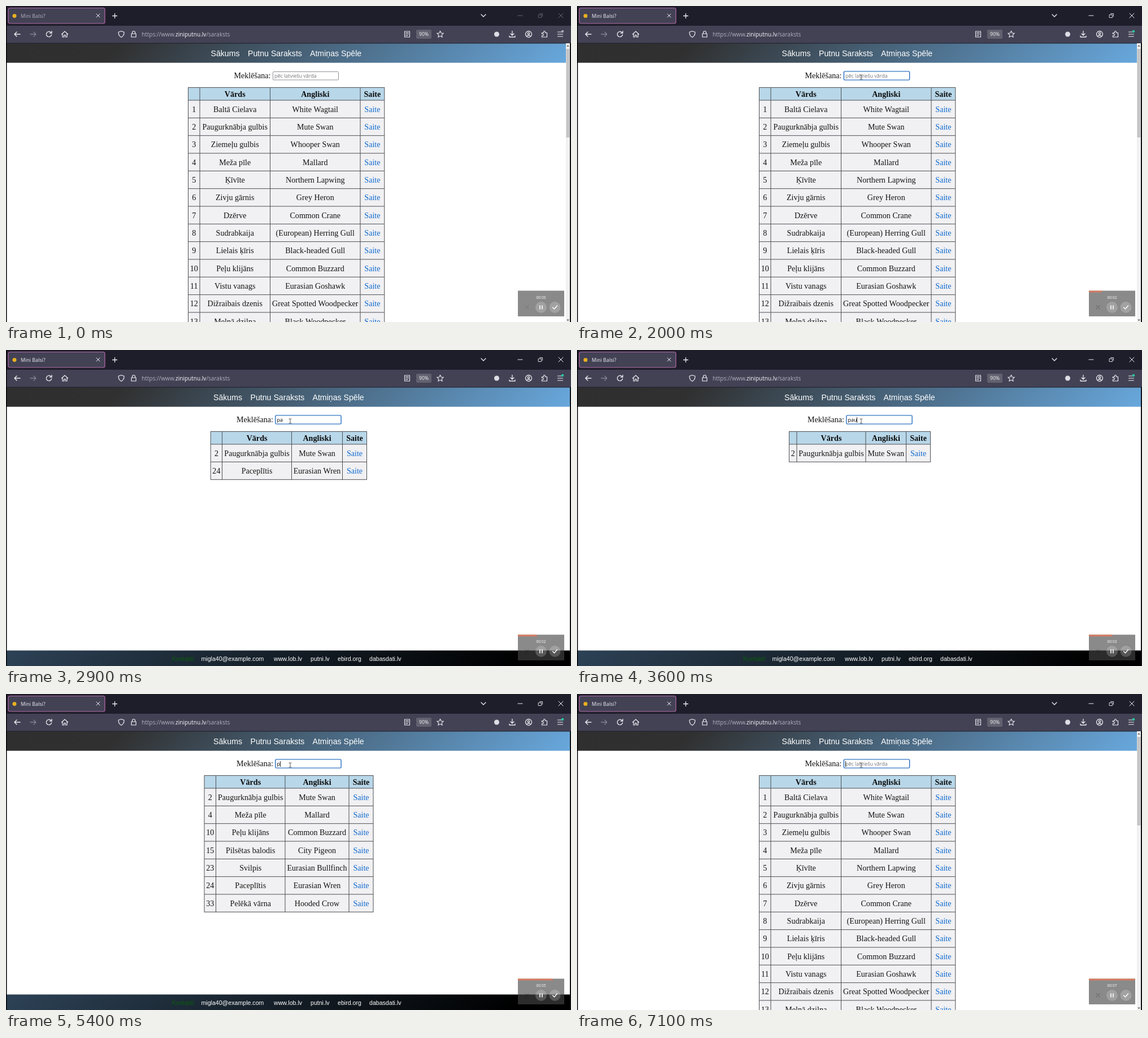
Write an HTML page with a canvas that moves like this. It is 1000 px wide and 560 px high and loops after 7.2 s.

```html
<!DOCTYPE html>
<html lang="lv">
<head>
<meta charset="utf-8">
<title>Mini Balsi?</title>
<style>
html, body { margin: 0; width: 100%; height: 100%; overflow: hidden; background: #000; }
canvas { display: block; }
</style>
</head>
<body>
<canvas id="stage" width="1000" height="560"></canvas>
<script>
const ctx = document.getElementById('stage').getContext('2d');
const LOOP = 7200, STEP = 100, FOCUS_AT = 1200;

const SERIF = '"Liberation Serif", "Times New Roman", serif';
const SANS = '"Liberation Sans", Arial, sans-serif';
const UI = '"Open Sans", "Noto Sans", sans-serif';
const LIGHT = '#ededf2';

const birds = [
  [1, 'Baltā Cielava', 'White Wagtail'],
  [2, 'Paugurknābja gulbis', 'Mute Swan'],
  [3, 'Ziemeļu gulbis', 'Whooper Swan'],
  [4, 'Meža pīle', 'Mallard'],
  [5, 'Ķīvīte', 'Northern Lapwing'],
  [6, 'Zivju gārnis', 'Grey Heron'],
  [7, 'Dzērve', 'Common Crane'],
  [8, 'Sudrabkaija', '(European) Herring Gull'],
  [9, 'Lielais ķīris', 'Black-headed Gull'],
  [10, 'Peļu klijāns', 'Common Buzzard'],
  [11, 'Vistu vanags', 'Eurasian Goshawk'],
  [12, 'Dižraibais dzenis', 'Great Spotted Woodpecker'],
  [13, 'Melnā dzilna', 'Black Woodpecker'],
  [15, 'Pilsētas balodis', 'City Pigeon'],
  [23, 'Svilpis', 'Eurasian Bullfinch'],
  [24, 'Paceplītis', 'Eurasian Wren'],
  [33, 'Pelēkā vārna', 'Hooded Crow']
];

// Column edges of the table for each search value
const columns = {
  '': [322.5, 343, 467.5, 627, 669.8],
  p: [351, 371.5, 494, 607, 650],
  pa: [362.2, 382.6, 505.5, 595.5, 638.5],
  pau: [375.5, 389, 511, 582.6, 625.5]
};

const typing = [
  [FOCUS_AT, ''], [2100, 'p'], [2400, 'pa'], [3600, 'pau'],
  [4900, 'pa'], [5200, 'p'], [5800, '']
];

function rect(x, y, w, h, color) {
  ctx.fillStyle = color;
  ctx.fillRect(x, y, w, h);
}

function box(x, y, w, h, r, fill, stroke, width = 1) {
  ctx.beginPath();
  ctx.roundRect(x, y, w, h, r);
  if (fill) { ctx.fillStyle = fill; ctx.fill(); }
  if (stroke) { ctx.strokeStyle = stroke; ctx.lineWidth = width; ctx.stroke(); }
}

function disc(x, y, r, color) {
  ctx.fillStyle = color;
  ctx.beginPath();
  ctx.arc(x, y, r, 0, 7);
  ctx.fill();
}

function text(s, x, y, font, color, align = 'left') {
  ctx.font = font;
  ctx.fillStyle = color;
  ctx.textAlign = align;
  ctx.fillText(s, x, y);
  return ctx.measureText(s).width;
}

function icon(x, y, path, color = LIGHT, width = 1.2) {
  ctx.save();
  ctx.translate(x, y);
  ctx.strokeStyle = color;
  ctx.lineWidth = width;
  ctx.lineCap = ctx.lineJoin = 'round';
  ctx.stroke(new Path2D(path));
  ctx.restore();
}

// Rectangle filled with a gradient running at 135 degrees
function slantRect(x, y, w, h, ...stops) {
  const cx = x + w / 2, cy = y + h / 2, d = (w + h) / 4;
  const g = ctx.createLinearGradient(cx - d, cy - d, cx + d, cy + d);
  for (const [at, color] of stops) g.addColorStop(at, color);
  rect(x, y, w, h, g);
}

const CROSS = 'M-3 -3L3 3M3 -3L-3 3';

function drawChrome(active) {
  rect(0, 0, 1000, 36, '#1e1d2a');
  rect(0, 35, 1000, 31, '#434255');
  box(4, 3.5, 171, 27.5, 3, '#434255', '#b56aa9', 1.2);
  disc(15, 17.5, 3.5, '#e8b021');
  text('Mini Balsi?', 26, 20.5, '8.9px ' + UI, active ? '#f2f2f6' : '#b3b2bd');
  icon(163, 17, CROSS, LIGHT, 1);
  icon(192.5, 17.5, 'M-4 0H4M0 -4V4', LIGHT, 1.3);
  icon(845, 17, 'M-4 -2L0 2L4 -2', LIGHT, 1.3);

  const ctl = active ? '#f0f0f4' : '#666572';
  icon(910, 17, 'M-4 0H4', ctl, 1);
  icon(946, 17, 'M-3.5 -1.5H1.5V3.5H-3.5ZM-1.5 -3.5H3.5V1.5', ctl, .9);
  icon(982, 17, 'M-4 -4L4 4M4 -4L-4 4', ctl, 1);

  icon(20, 50, 'M5 0H-5M-1 -4L-5 0L-1 4', LIGHT, 1.4);
  icon(48, 50, 'M-5 0H5M1 -4L5 0L1 4', '#83828f', 1.3);
  icon(76, 50, 'M4.6 1A4.7 4.7 0 1 1 3.4 -3.3L5 -2M5 -5.5V-1.8H1.4', LIGHT, 1.3);
  icon(104, 50, 'M-5.5 0L0 -5L5.5 0M-4 -1V5H-1.3V1.5H1.3V5H4V-1', LIGHT, 1.2);
  icon(204, 50, 'M0 -5.5L5 -3.7C5 1 3 4 0 5.5C-3 4 -5 1 -5 -3.7Z');
  icon(226, 50, 'M-4 -1H4V5H-4ZM-2.5 -1V-3A2.5 2.5 0 0 1 2.5 -3V-1');

  const url = '10.05px ' + UI;
  let x = 240;
  for (const [part, color] of [['https://www.', '#b1b0bc'], ['ziniputnu.lv', '#fafafd'], ['/saraksts', '#b1b0bc']])
    x += text(part, x, 54, url, color);

  icon(710, 50, 'M-4.5 -5H4.5V5H-4.5ZM-2.5 -2.5H2.5M-2.5 0H2.5M-2.5 2.5H1', LIGHT, 1.1);
  box(726, 42, 27, 16, 2, '#62616f');
  text('90%', 739.5, 53.3, '8.6px ' + UI, '#f4f4f8', 'center');
  icon(768.5, 50, 'M0 -5.8L1.7 -2L5.8 -1.6L2.7 1.2L3.6 5.3L0 3.1L-3.6 5.3L-2.7 1.2L-5.8 -1.6L-1.7 -2Z', LIGHT, 1.1);
  disc(868.5, 50, 4.5, '#dedde4');
  icon(896, 50, 'M0 -5.5V2M-3 -1L0 2L3 -1M-5 3V5H5V3', LIGHT, 1.3);
  icon(925, 50, 'M5.5 0A5.5 5.5 0 1 1 -5.5 0A5.5 5.5 0 1 1 5.5 0M1.7 -1.4A1.7 1.7 0 1 1 -1.7 -1.4A1.7 1.7 0 1 1 1.7 -1.4M-3 3Q0 1 3 3', LIGHT, 1.3);
  icon(953, 50, 'M-4.5 -2.5H-1.5V-4A1.5 1.5 0 0 1 1.5 -4V-2.5H4.5V5H-4.5V2.5H-3A1.5 1.5 0 0 0 -3 -.5H-4.5Z');
  icon(981, 50, 'M-4.5 -4H2M-4.5 0H4.5M-4.5 4H4.5', LIGHT, 1.2);
  disc(985, 45, 2.3, active ? '#2cc5a2' : '#a9a8b3');
}

function drawHeader(right, shift) {
  slantRect(1, 66, right - 1, 34.6, [0, '#2f2f2f'], [.2, '#303030'], [1, '#68a8dd']);
  rect(0, 65.5, 1000, 1, '#1c1c26');
  const font = '14.15px ' + SANS;
  text('Sākums', 362.5 + shift, 89, font, '#fff');
  text('Putnu Saraksts', 428 + shift, 89, font, '#fff');
  text('Atmiņas Spēle', 538 + shift, 89, font, '#fff');
}

function drawSearch(value, shift, focused, caret) {
  const x = 472.5 + shift;
  text('Meklēšana:', 403.5 + shift, 127.5, '14.1px ' + SERIF, '#111');
  if (focused) {
    box(x, 116, 116, 15, 2, '#fff', 'rgba(90,160,235,.4)', 2.6);
    box(x, 116, 116, 15, 1.5, '#fff', '#2468b8', 1.2);
  } else {
    box(x, 116.5, 116, 14.5, 1, '#fff', '#8f8f96');
  }
  const font = '8.95px ' + UI;
  if (!value) text('pēc latviešu vārda', x + 2.5, 127, font, '#757579');
  const w = value ? text(value, x + 2.5, 127, font, '#000') : 0;
  if (caret) rect(Math.round(x + 2.5 + w), 119, 1, 10, '#222');
}

function drawTable(value) {
  const edges = columns[value];
  const rows = value ? birds.filter(b => b[1].toLowerCase().includes(value)) : birds.slice(0, 13);
  const left = edges[0], width = edges[4] - left, top = 144.5, head = 167, pitch = 31.33;
  const bottom = head + rows.length * pitch;
  const mid = i => (edges[i] + edges[i + 1]) / 2;

  rect(left, top, width, head - top, '#b8d7e9');
  rect(left, head, width, bottom - head, '#f1f0f2');
  ctx.strokeStyle = '#4c4f53';
  ctx.lineWidth = 1;
  ctx.beginPath();
  const line = y => { ctx.moveTo(left, y); ctx.lineTo(edges[4], y); };
  line(top);
  for (let i = 0; i <= rows.length; i++) line(head + i * pitch);
  for (const x of edges) { ctx.moveTo(x, top - .5); ctx.lineTo(x, bottom + .5); }
  ctx.stroke();

  ['', 'Vārds', 'Angliski', 'Saite'].forEach((s, i) =>
    text(s, mid(i), 161, 'bold 14.1px ' + SERIF, '#0c0c0c', 'center'));
  rows.forEach((row, r) => [...row, 'Saite'].forEach((s, i) =>
    text(s, mid(i), 187.8 + r * pitch, '14.1px ' + SERIF, i === 3 ? '#0f6bd0' : '#151515', 'center')));
}

function drawScrollbar() {
  rect(991, 66, 7, 494, '#f1f1f1');
  rect(991.5, 76, 6, 157, '#c4c4c6');
  ctx.fillStyle = '#606060';
  ctx.fill(new Path2D('M992.3 72L994.5 69L996.7 72ZM992.3 555.5L994.5 558.5L996.7 555.5Z'));
}

function drawFooter() {
  slantRect(1, 532.5, 997, 28, [0, '#2d4256'], [.9, '#000']);
  const font = '10.6px ' + SANS;
  text('Kontakti:', 294, 551, font, '#0a5c0c');
  [['migla40@example.com', 345.5], ['www.lob.lv', 474], ['putni.lv', 539], ['ebird.org', 587], ['dabasdati.lv', 643]]
    .forEach(([s, x]) => text(s, x, 551, font, '#fff'));
}

function drawRecorder(t) {
  rect(906, 504.5, 82, 45.5, 'rgba(70,70,70,.63)');
  const end = 906 + 82 * t / 7150;
  for (let x = 906; x < end; x += 2) rect(x, 504.5, Math.min(1.5, end - x), 3, '#ef7654');
  text('00:0' + Math.floor(t / 1000), 947, 518.5, '6.6px ' + UI, '#fff', 'center');
  icon(922, 534, CROSS, `rgba(0,0,0,${t ? .2 : .1})`, 1.2);
  for (const x of [947, 971.5]) disc(x, 534, 10, 'rgba(255,255,255,.2)');
  icon(947, 534, 'M-2 -3V3M2 -3V3', '#fff', 1.6);
  icon(971.5, 534, 'M-4 0L-1 3L4 -3', '#fff', 1.4);
}

function drawPointer(t) {
  if (t < 300) return;
  const k = 1 - Math.pow(1 - Math.min(1, (t - 300) / 400), 3);
  const x = 560 - 57 * k, y = 215 - 89 * k;
  if (k > .9) {
    icon(x, y, 'M-2 -4H-.6L0 -3.4L.6 -4H2M0 -3.4V3.4M-2 4H-.6L0 3.4L.6 4H2', '#444', .9);
  } else {
    const arrow = 'M0 0V11L2.6 8.6L4.3 12.3L6 11.5L4.4 8H8Z';
    ctx.save();
    ctx.translate(x, y);
    ctx.fillStyle = '#fff';
    ctx.fill(new Path2D(arrow));
    ctx.restore();
    icon(x, y, arrow, '#222', .8);
  }
}

function draw(t) {
  const focused = t >= FOCUS_AT;
  const [since, value] = typing.filter(k => k[0] <= t).pop() || [0, ''];
  const caret = focused && (t - since) % 1000 < 500;
  const shift = value ? 4.5 : 0;

  rect(0, 0, 1000, 560, '#fff');
  drawChrome(focused);
  drawHeader(value ? 998 : 991, shift);
  drawSearch(value, shift, focused, caret);
  drawTable(value);
  if (value) drawFooter(); else drawScrollbar();
  rect(0, 0, 1.5, 560, '#08080a');
  rect(998, 66, 2, 494, '#121216');
  drawRecorder(t);
  drawPointer(t);
}

const start = performance.now();
function tick() {
  const t = (performance.now() - start) % LOOP;
  draw(Math.floor(t / STEP) * STEP);
  requestAnimationFrame(tick);
}
tick();
</script>
</body>
</html>
```
